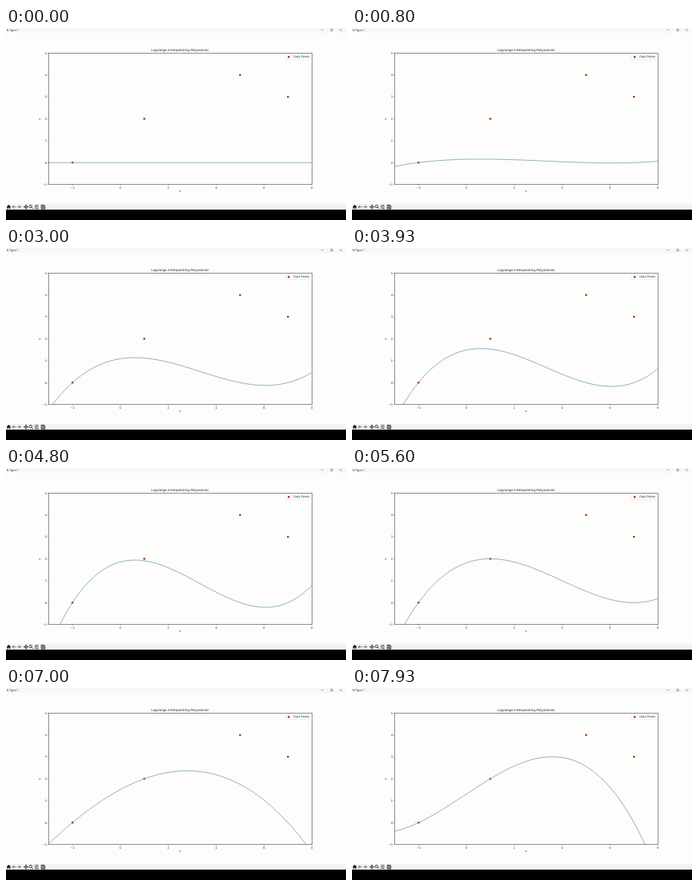
Recreate the animation shown at these times as an HTML page. Size 426 by 240 pixels, loop 8 s.

```html
<!DOCTYPE html>
<html lang="en">
<head>
<meta charset="utf-8">
<title>Lagrange Interpolating Polynomial</title>
<style>
  html, body { margin: 0; width: 100%; height: 100%; overflow: hidden; background: #fdfdfd; }
  svg { display: block; width: 100%; height: 100%; }
  text { font-family: "DejaVu Sans", sans-serif; font-size: 3.5px; fill: #222; }
  .mid { text-anchor: middle; }
  .end { text-anchor: end; }
  .ui { fill: none; stroke: #222; stroke-width: .8; }
</style>
</head>
<body>
<svg viewBox="0 0 426 240">
  <clipPath id="area"><rect x="53" y="31.2" width="330" height="164.4"/></clipPath>

  <rect width="426" height="240" fill="#fdfdfc"/>
  <rect width="426" height="6" fill="#faf5f7"/>
  <rect y="220" width="426" height="7" fill="#f3f3f1"/>
  <rect y="227" width="426" height="13" fill="#000"/>

  <!-- window bar -->
  <circle cx="2" cy="2.7" r="1.1" fill="#b06a6a"/>
  <text x="4.5" y="4" style="font: 3px 'Open Sans', sans-serif">Figure 1</text>
  <path class="ui" style="stroke:#666;stroke-width:.6" d="M395 2.6h2.6M407 1.5h2.2v2.2h-2.2zM418.5 1.5l2.2 2.2m0-2.2l-2.2 2.2"/>

  <!-- toolbar -->
  <path d="M.6 223.6L3.4 221l2.8 2.6h-.9v2.5H4v-1.6H2.8v1.6H1.5v-2.5z" fill="#111"/>
  <path class="ui" d="M12.4 223.6H8m2-2l-2 2 2 2M14 223.6h4.4m-2-2l2 2-2 2" style="stroke:#555"/>
  <path class="ui" d="M22.4 223.6h5.2M25 221v5.2M24 222l1-1 1 1M24 225.2l1 1 1-1M23.4 222.6l-1 1 1 1M26.6 222.6l1 1-1 1"/>
  <path class="ui" d="M32 224.2l2 2"/><circle class="ui" cx="30.8" cy="223" r="1.7"/>
  <path class="ui" style="stroke-width:.6" d="M35.8 221.7h5M35.8 223.6h5M35.8 225.5h5M39 220.9v1.6M37.2 222.8v1.6M39.5 224.7v1.6"/>
  <path class="ui" d="M44.2 221.4h3.8l.8.8v3.8h-4.6zM45.3 221.4v1.6h2.2v-1.6M45.3 226v-1.6h2.4v1.6"/>

  <!-- chart -->
  <text class="mid" x="218" y="29.4" style="font-size:4.17px">Lagrange Interpolating Polynomial</text>
  <text class="mid" x="218" y="205">x</text>
  <text class="mid" transform="translate(43.2 113.7) rotate(-90)">y</text>
  <g id="ticks"></g>
  <g id="points" fill="#c80c0c"></g>
  <path id="curve" clip-path="url(#area)" fill="none" stroke="#5f9aa8" stroke-width=".75"/>
  <rect x="53.4" y="31.4" width="330" height="164.1" fill="none" stroke="#55556c" stroke-width=".65"/>

  <rect x="349.3" y="33.3" width="32.2" height="6.2" rx=".7" fill="#fefefe" stroke="#d8d8d8" stroke-width=".4"/>
  <circle cx="354.2" cy="36.2" r="1.25" fill="#c80c0c"/>
  <text x="360.2" y="37.4">Data Points</text>
</svg>
<script>
const LOOP = 8000, STEP = 1000 / 15, START = 440, RISE = 4567;
const nodes = [[-2, 0], [1, 2], [5, 4], [7, 3]];
const px = x => 143.3 + 30 * x;
const py = y => 168.3 - 27.4 * y;
const byId = id => document.getElementById(id);

function add(parent, tag, attrs, label = "") {
  const el = document.createElementNS("http://www.w3.org/2000/svg", tag);
  for (const key in attrs) el.setAttribute(key, attrs[key]);
  el.textContent = label;
  byId(parent).append(el);
}

const axisLabel = v => String(v).replace("-", "\u2212");
const tickMark = d => add("ticks", "path", { d, stroke: "#444", "stroke-width": .5 });

for (let x = -2; x <= 8; x += 2) {
  tickMark(`M${px(x)} 195.6v1.2`);
  add("ticks", "text", { class: "mid", x: px(x), y: 200.6 }, axisLabel(x));
}
for (let y = -1; y <= 5; y++) {
  tickMark(`M53 ${py(y)}h-1.2`);
  add("ticks", "text", { class: "end", x: 51, y: py(y) + 1.3 }, axisLabel(y));
}
for (const [x, y] of nodes) add("points", "circle", { cx: px(x), cy: py(y), r: 1.25 });

// Lagrange basis polynomial of node k
const basis = (k, x) => nodes.reduce((p, [xi], i) =>
  i === k ? p : p * (x - xi) / (nodes[k][0] - xi), 1);

// Each node's height is blended in, one after another
function draw(time) {
  const weights = nodes.map(([, y], k) =>
    y * Math.min(1, Math.max(0, (time - START - (k - 1) * RISE) / RISE)));
  let d = "";
  for (let i = 0; i <= 165; i++) {
    const x = -3 + i / 15;
    const y = weights.reduce((sum, w, k) => sum + w * basis(k, x), 0);
    d += `${i ? "L" : "M"}${px(x).toFixed(2)} ${py(y).toFixed(2)}`;
  }
  byId("curve").setAttribute("d", d);
}

const origin = performance.now();
function frame() {
  const time = (performance.now() - origin) % LOOP;
  draw(Math.floor(time / STEP + .05) * STEP);
  requestAnimationFrame(frame);
}
frame();
</script>
</body>
</html>
```
